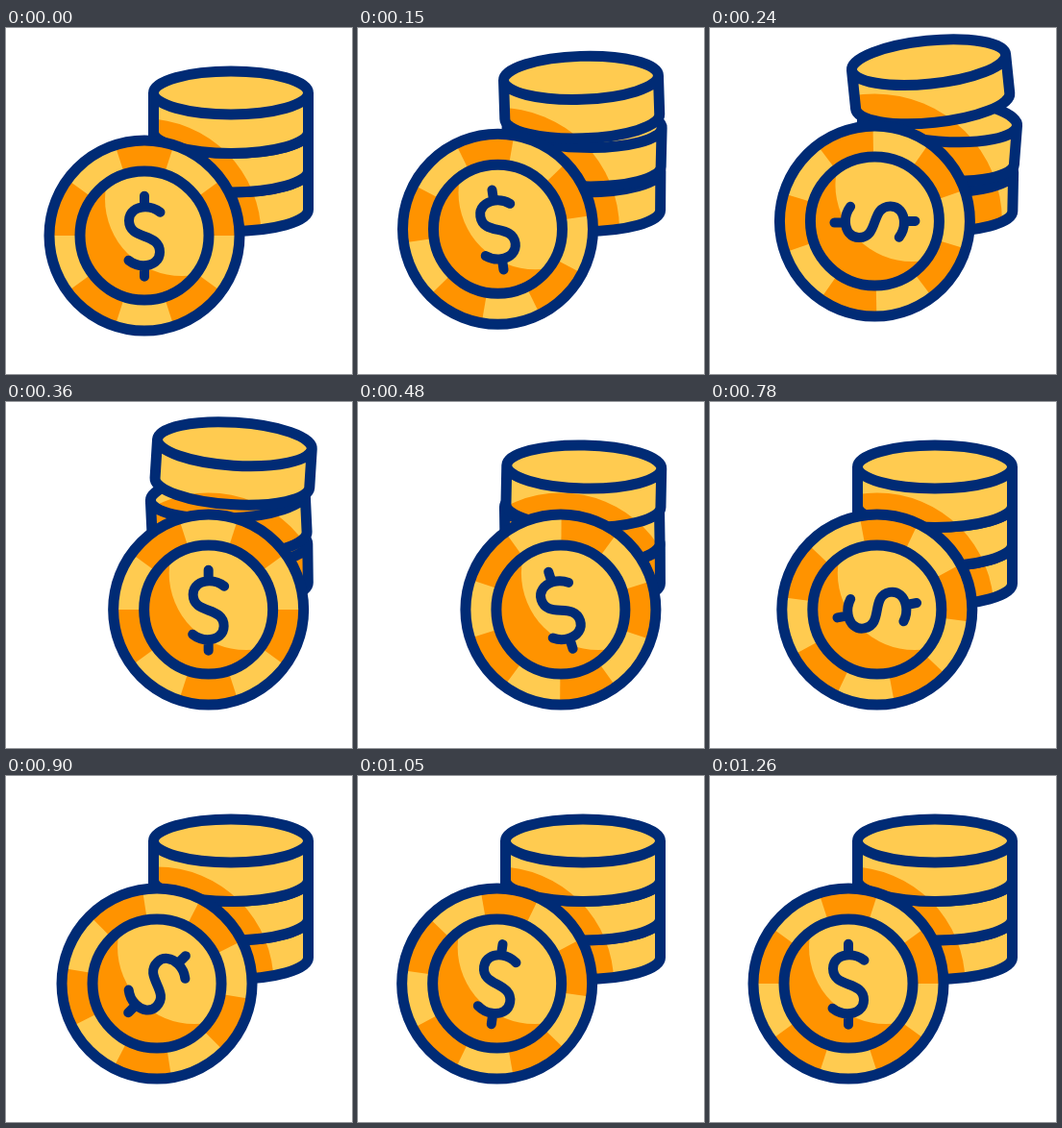
These frames come from a looping animation (360x360 px, 1320 ms). An HTML page with a canvas:

```html
<!DOCTYPE html>
<html>
<head>
<meta charset="utf-8">
<style>
  html, body { margin: 0; width: 100%; height: 100%; overflow: hidden; background: #fff; }
  canvas { display: block; width: 360px; height: 360px; }
</style>
</head>
<body>
<canvas id="stage"></canvas>
<script>
const LOOP = 1320, TAU = Math.PI * 2, RAD = Math.PI / 180;
const NAVY = '#002b75', YELLOW = '#ffcb50', ORANGE = '#ff9300';
const RX = 80.5, RY = 22.5, LAYER = 40.5, GROUND = 216;

const canvas = document.getElementById('stage');
const ratio = window.devicePixelRatio || 1;
canvas.width = canvas.height = 360 * ratio;
const ctx = canvas.getContext('2d');
ctx.lineCap = ctx.lineJoin = 'round';

const dollar = new Path2D(
  'M16.5-25C12-28.5 7-30.5 1-30.5C-9-30.5-16-25-16-16.5C-16-6-8-3 0 0' +
  'C8 3 16 6 16 16.5C16 25 9 30.5-1 30.5C-7 30.5-12 28.5-16.5 25M0-42V-31M0 31V42');

const progress = (t, from, to) => Math.min(1, Math.max(0, (t - from) / (to - from)));
const smooth = p => p * p * (3 - 2 * p);
const arch = p => 4 * p * (1 - p);

// Eased interpolation through [time, value] keys
function track(t, keys) {
  let value = keys[0][1];
  for (let i = 1; i < keys.length; i++) {
    const [t0, v0] = keys[i - 1], [t1, v1] = keys[i];
    if (t >= t0) value = v0 + (v1 - v0) * smooth(progress(t, t0, t1));
  }
  return value;
}

function resetView() {
  ctx.setTransform(ratio, 0, 0, ratio, 0, 0);
}

function disc(x, y, r, color) {
  ctx.beginPath();
  ctx.arc(x, y, r, 0, TAU);
  ctx.fillStyle = color;
  ctx.fill();
}

function ring(r) {
  ctx.beginPath();
  ctx.arc(0, 0, r, 0, TAU);
  ctx.lineWidth = 11;
  ctx.strokeStyle = NAVY;
  ctx.stroke();
}

function stackCoin(index, dx, lift, tilt, shadow) {
  ctx.save();
  ctx.translate(234 + dx, 67.5 + index * LAYER - lift);
  ctx.rotate(tilt * RAD);

  const body = new Path2D();
  body.ellipse(0, 0, RX, RY, 0, Math.PI, TAU);
  body.lineTo(RX, LAYER);
  body.ellipse(0, LAYER, RX, RY, 0, 0, Math.PI);
  body.closePath();
  ctx.fillStyle = YELLOW;
  ctx.fill(body);

  // The shadow belongs to the front coin, so it ignores this coin's pose
  ctx.save();
  ctx.clip(body);
  resetView();
  disc(shadow.x, shadow.y, shadow.r, ORANGE);
  ctx.restore();

  body.ellipse(0, 0, RX, RY, 0, Math.PI, 0, true);
  ctx.lineWidth = 11;
  ctx.strokeStyle = NAVY;
  ctx.stroke(body);
  ctx.restore();
}

function frontCoin(x, y, angle) {
  ctx.save();
  ctx.translate(x, y);
  disc(0, 0, 99, YELLOW);

  ctx.save();
  ctx.rotate(angle * RAD);
  ctx.fillStyle = ORANGE;
  for (let i = 0; i < 5; i++) {
    const mid = (i * 72 - 90) * RAD;
    ctx.beginPath();
    ctx.moveTo(0, 0);
    ctx.arc(0, 0, 99, mid - 18 * RAD, mid + 18 * RAD);
    ctx.fill();
  }
  ctx.restore();

  // Inner face: the light stays fixed while the coin turns
  disc(0, 0, 67, ORANGE);
  ctx.save();
  ctx.clip();
  disc(39, -38, 80, YELLOW);
  ctx.restore();
  ring(99);
  ring(67);

  ctx.translate(0, 0.7);
  ctx.rotate(angle * RAD);
  ctx.lineWidth = 10;
  ctx.stroke(dollar);
  ctx.restore();
}

function draw(t) {
  const back = progress(t, 400, 1090);
  const jump = arch(progress(t, 120, 360));
  const x = 144 + track(t, [[128, 0], [390, 69], [410, 69], [1090, 0]]);
  const y = GROUND - 15 * jump;
  const angle = -180 * smooth(progress(t, 120, 360))
              - 180 * (0.75 * back + 0.25 * smooth(back));
  const shadow = { x, y, r: 121.5 + 11 * jump };
  const hop = arch(progress(t, 105, 440));
  const sway = track(t, [[105, 0], [230, -6], [380, 4], [580, -1.6], [740, 0]]);

  resetView();
  ctx.fillStyle = '#fff';
  ctx.fillRect(0, 0, 360, 360);
  stackCoin(2, -0.2 * sway, 0, -0.2 * sway, shadow);
  stackCoin(1, -0.9 * sway, 13 * hop, -0.75 * sway, shadow);
  stackCoin(0, 1.1 * sway, 33 * hop, sway, shadow);
  frontCoin(x, y, angle);
}

function tick() {
  draw(performance.now() % LOOP);
  requestAnimationFrame(tick);
}
tick();
</script>
</body>
</html>
```
